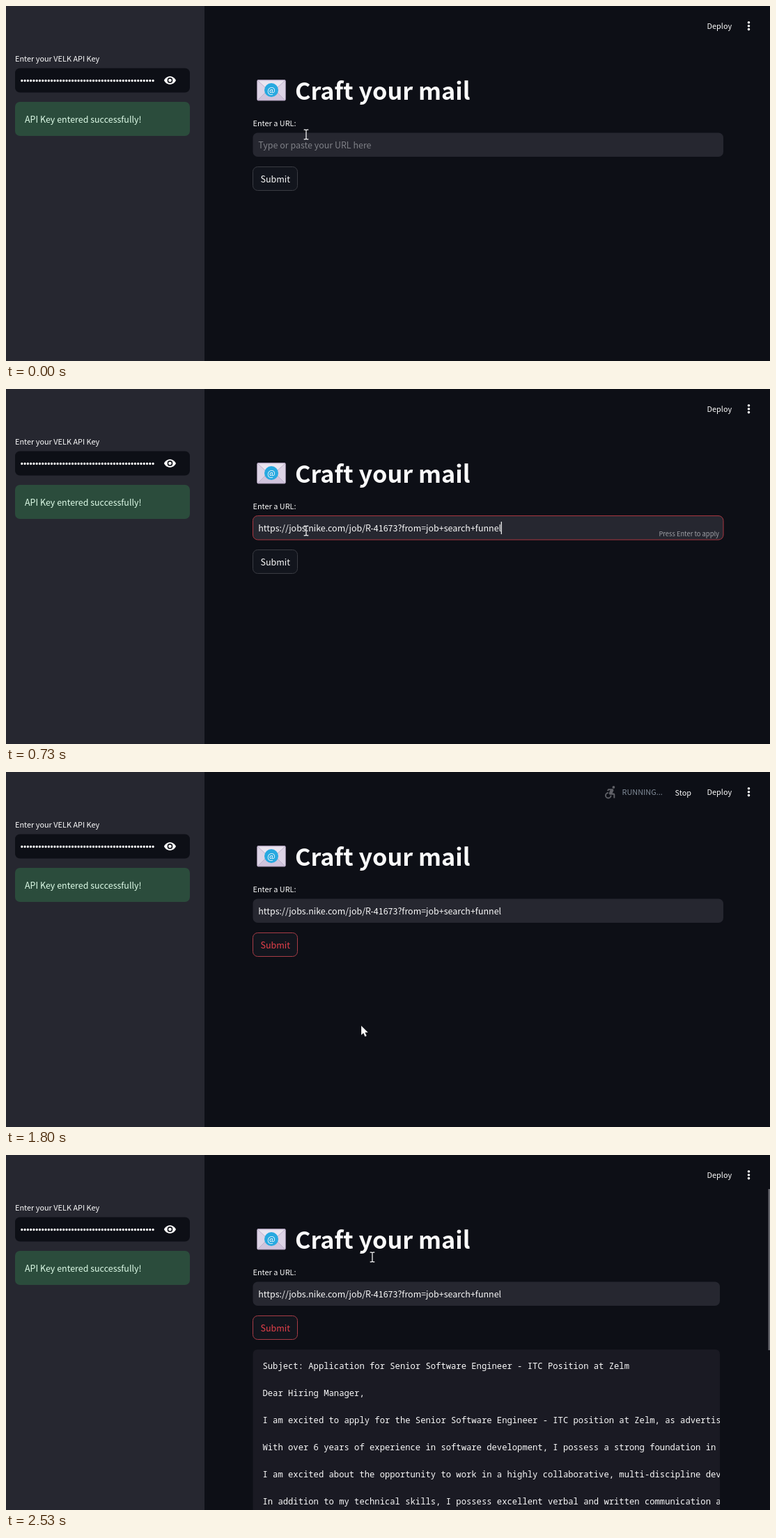
An HTML page that plays this animation: 1097x511 px, repeating every 2560 ms.

```html
<!DOCTYPE html>
<html lang="en">
<head>
<meta charset="utf-8">
<title>Craft your mail</title>
<style>
  html, body { margin: 0; height: 100%; overflow: hidden; background: #0d0f16; }
  svg { display: block; width: 100vw; height: 100vh; }
  text {
    font-family: "Noto Sans CJK JP", "Noto Sans CJK SC", "Noto Sans CJK", "Open Sans", sans-serif;
    font-size: calc(var(--sans) * 1px); font-weight: 500; fill: #fafafa; white-space: pre;
  }
  .small { font-size: calc(var(--sans) * .875px); }
  .tiny { font-size: calc(var(--sans) * .75px); font-weight: 400; fill: #a0a1a7; }
  .title { font-size: calc(var(--title) * 1px); font-weight: 700; }
  .code text {
    font-family: "Noto Sans Mono", "DejaVu Sans Mono", monospace;
    font-size: calc(var(--mono) * 1px); font-weight: 400;
  }
</style>
</head>
<body>
<svg viewBox="0 0 1097 511">
  <defs>
    <clipPath id="dotClip"><path d="M20 90h193.3v34H20z"/></clipPath>
    <clipPath id="codeClip"><path d="M354 280h671v231H354z"/></clipPath>
  </defs>
  <rect width="1097" height="511" fill="#0d0f16"/>

  <!-- sidebar -->
  <rect width="285" height="511" fill="#262730"/>
  <text class="small" x="13" y="80">Enter your VELK API Key</text>
  <rect x="13" y="89.5" width="251" height="35" rx="7" fill="#0d0f16"/>
  <path d="M22.8 107.5H216" clip-path="url(#dotClip)" stroke="#fafafa" stroke-width="3.3"
    stroke-linecap="round" stroke-dasharray="0 4.28"/>
  <path transform="translate(226.2 97.7) scale(.773)" fill="#fafafa" d="M12 4.5C7 4.5 2.73 7.61 1 12c1.73 4.39 6 7.5 11 7.5s9.27-3.11 11-7.5c-1.73-4.39-6-7.5-11-7.5zM12 17a5 5 0 1 1 0-10 5 5 0 0 1 0 10zm0-8a3 3 0 1 0 0 6 3 3 0 0 0 0-6z"/>
  <rect x="13" y="138" width="251" height="49" rx="7" fill="#2b4c3c"/>
  <text x="27" y="167.5" style="fill:#dffde9">API Key entered successfully!</text>

  <!-- toolbar -->
  <g id="running">
    <path transform="translate(855.3 17.6) scale(.95)" fill="#606167" d="M16 4.5a2 2 0 1 0 4 0 2 2 0 1 0-4 0zM15 17h-2a3 3 0 1 1-3-3v-2a5 5 0 1 0 5 5zm3-3.5h-1.86l1.67-3.67C18.42 8.5 17.44 7 15.96 7h-5.2c-.81 0-1.54.47-1.87 1.2L8.22 10l1.92.53.65-1.53H13l-1.83 4.1c-.6 1.33.39 2.9 1.85 2.9H18v5h2v-5.5c0-1.1-.9-2-2-2z"/>
    <text class="small" x="884.5" y="33" style="fill:#808b98">RUNNING...</text>
    <text class="small" x="960.5" y="33.5">Stop</text>
  </g>
  <text class="small" x="1006.5" y="33">Deploy</text>
  <path d="M1066.5 23.8v10" stroke="#fafafa" stroke-width="3.6" stroke-linecap="round" stroke-dasharray="0 4.9"/>

  <!-- heading -->
  <rect x="360.7" y="106.5" width="40.6" height="29.5" rx="1.5" fill="#ddd4e6" stroke="#b7a8c4" stroke-width=".8"/>
  <path d="M361.5 135.5L376 121h10l14.5 14.5z" fill="#d0c4dc" stroke="#b7a8c4" stroke-width=".8"/>
  <path d="M361 107h40l-18.5 17q-1.500 1.300-3 0z" fill="#ebe5f0" stroke="#b7a8c4" stroke-width=".8"/>
  <circle cx="381" cy="121" r="10" fill="#28a9e0"/>
  <text x="381" y="125.5" text-anchor="middle">@</text>
  <text id="title" class="title" x="415" y="135">Craft your mail</text>

  <!-- form -->
  <text class="small" x="354.5" y="172.5">Enter a URL:</text>
  <rect id="field" x="354.5" y="182.5" height="34.5" rx="7" fill="#262730"/>
  <text id="url" x="362.3" y="204.7"></text>
  <text id="hint" class="tiny" x="1024" y="212.3" text-anchor="end">Press Enter to apply</text>
  <path id="caret" d="M0 191v18" stroke="#fafafa" stroke-width="1.2"/>
  <rect id="button" x="354.5" y="231.5" width="64" height="34" rx="7" fill="#12151d"/>
  <text id="submit" x="386.8" y="253.5" text-anchor="middle">Submit</text>

  <!-- letter -->
  <g id="result">
    <path d="M354.5 511V287q0-7 7-7H1018q7 0 7 7v224z" fill="#1a1a23"/>
    <g id="letter" class="code" clip-path="url(#codeClip)"></g>
    <g id="copy" fill="none" stroke="#e2e2e4" stroke-width="1.2">
      <rect x="998.3" y="303.3" width="8.4" height="8.4" rx="1.5"/>
      <path d="M996.5 307.7h-.5q-1.5 0-1.5-1.5v-5.4q0-1.5 1.5-1.5h5.4q1.5 0 1.5 1.5v.5"/>
    </g>
    <rect x="1094.5" y="49" width="2.5" height="232" fill="#66676d"/>
  </g>

  <g id="cursor">
    <path id="beam" d="M-3.3-6.8h2.3l1 .8 1-.8h2.3M0-6V6M-3.3 6.8h2.3l1-.8 1 .8h2.3" fill="none" stroke="#fff" stroke-width="1.2"/>
    <path id="arrow" d="M0 0v13.8l3.2-2.9 2.2 5.1 2.5-1.1-2.2-4.9h4.3z" fill="#fff" stroke="#0008" stroke-width=".5"/>
  </g>
</svg>
<script>
const LOOP = 2560;
const FOCUS = 260, PASTE = 620, CLICK = 900, RUN = 950, DONE = 1900, LEAVE = 2200;
const URL_TEXT = "https://jobs.nike.com/job/R-41673?from=job+search+funnel";
const PROMPT = "Type or paste your URL here";
const LETTER = [
  "Subject: Application for Senior Software Engineer - ITC Position at Zelm",
  "Dear Hiring Manager,",
  "I am excited to apply for the Senior Software Engineer - ITC position at Zelm, as advertised",
  "With over 6 years of experience in software development, I possess a strong foundation in",
  "I am excited about the opportunity to work in a highly collaborative, multi-discipline development",
  "In addition to my technical skills, I possess excellent verbal and written communication and"
];
// time, x, y
const PATH = [
  [0, 431, 185], [60, 431, 185], [230, 431, 204], [760, 431, 204], [860, 402, 248],
  [920, 402, 248], [1040, 510, 365], [LEAVE, 510, 365], [2400, 526, 147], [LOOP, 526, 147]
];

const $ = id => document.getElementById(id);
const show = (id, on) => $(id).setAttribute("visibility", on ? "inherit" : "hidden");
const set = (id, attrs) => { for (const k in attrs) $(id).setAttribute(k, attrs[k]); };

LETTER.forEach((line, i) => {
  const el = document.createElementNS("http://www.w3.org/2000/svg", "text");
  el.setAttribute("x", 368.5);
  el.setAttribute("y", 307.6 + 39 * i);
  el.textContent = line;
  $("letter").append(el);
});

// font size at which the sample has the given length
const pen = document.createElement("canvas").getContext("2d");
function sizeFor(el, sample, length) {
  const { fontWeight, fontFamily } = getComputedStyle(el);
  pen.font = `${fontWeight} 100px ${fontFamily}`;
  return 100 * length / pen.measureText(sample).width;
}
const root = document.documentElement.style;
root.setProperty("--sans", sizeFor($("url"), URL_TEXT, 349.2));
root.setProperty("--title", sizeFor($("title"), "Craft your mail", 251.5));
root.setProperty("--mono", sizeFor($("letter").firstChild, LETTER[0], 527));

function cursorAt(t) {
  const i = PATH.findIndex(p => p[0] > t);
  const [t0, x0, y0] = PATH[i - 1], [t1, x1, y1] = PATH[i];
  const u = (t - t0) / (t1 - t0), e = u * u * (3 - 2 * u);
  return [x0 + (x1 - x0) * e, y0 + (y1 - y0) * e];
}

function draw(t) {
  const focused = t >= FOCUS && t < CLICK, pasted = t >= PASTE, done = t >= DONE;
  const [x, y] = cursorAt(t);
  const hover = x < 419 && y > 231 && y < 266;
  const red = hover || t >= CLICK;

  set("field", { width: done ? 670.5 : 675.5, stroke: focused ? "#a83640" : "none" });
  $("url").textContent = pasted ? URL_TEXT : PROMPT;
  $("url").style.fill = pasted ? "#fafafa" : "#7f8087";
  show("hint", focused && pasted);
  show("caret", focused);
  set("caret", { transform: `translate(${pasted ? 711.3 : 362.6})` });
  set("button", { stroke: red ? "#a83c46" : "#3a3c43" });
  $("submit").style.fill = red ? "#e5404a" : "#fafafa";

  show("running", t >= RUN && !done);
  show("result", done);
  show("copy", done && y > 280);

  const arrow = t >= 775 && t < LEAVE;
  set("cursor", { transform: `translate(${x} ${y})` });
  show("arrow", arrow);
  show("beam", !arrow);
}

const start = performance.now();
function tick() {
  draw((performance.now() - start) % LOOP);
  requestAnimationFrame(tick);
}
tick();
</script>
</body>
</html>
```
